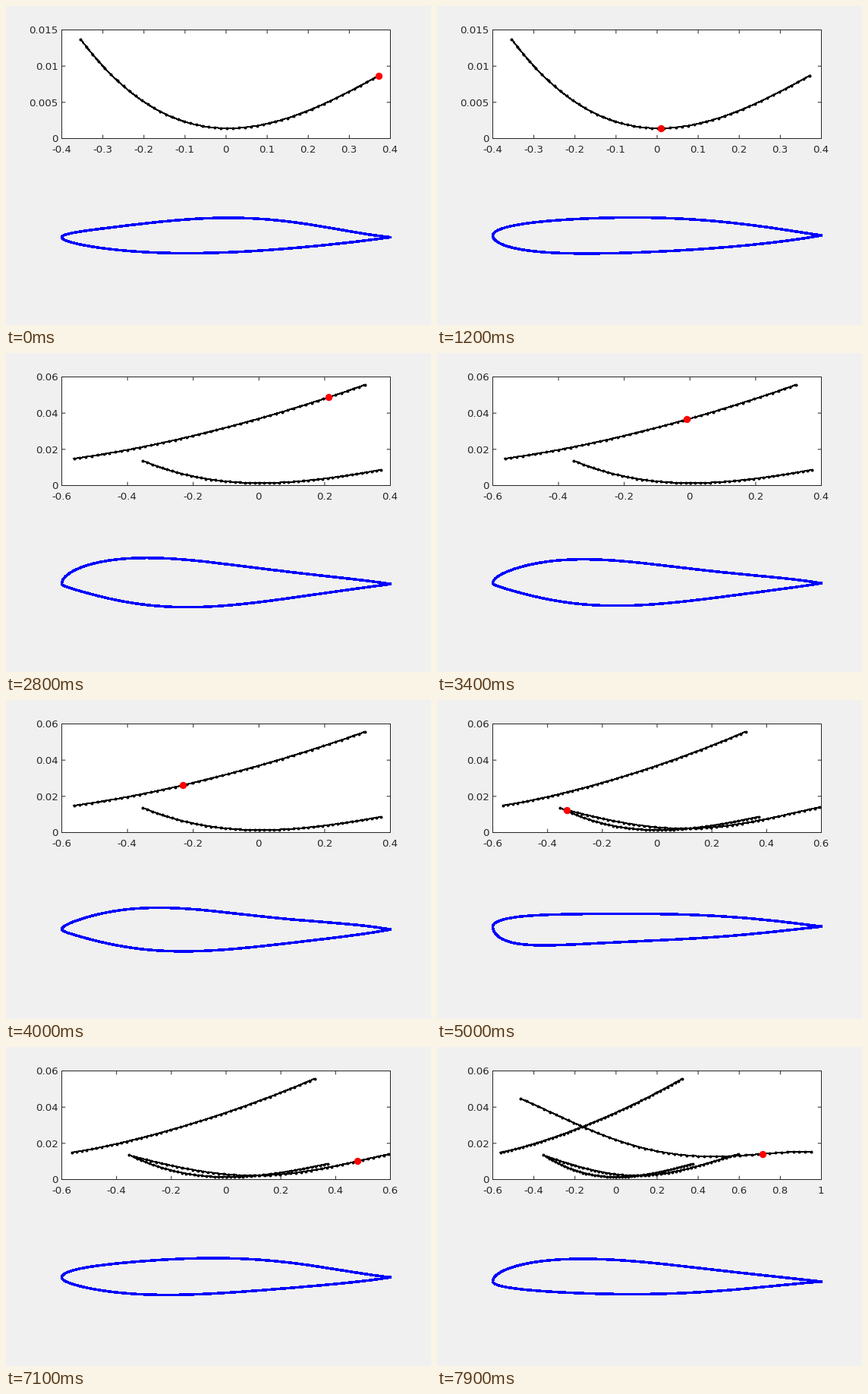
These frames come from a looping animation (560x420 px, 8 s). A matplotlib script:

```python
import numpy as np
import matplotlib.pyplot as plt
from matplotlib.animation import FuncAnimation
from matplotlib.patches import Rectangle

W, H, DPI = 560, 420, 80
PT = 72 / DPI                      # points per pixel
LEFT, RIGHT, TOP, BOTTOM = 73.5, 506.5, 31.5, 174.5
FOIL_MID = 302.2
STEPS = 25                         # frames per sweep
INK = "#262626"

plt.rcParams["font.family"] = "DejaVu Sans"


class Sweep:
    """A polar curve and the foil that morphs while the marker runs along it."""

    def __init__(self, lo, hi, values, first, last, backward=True):
        keys = np.linspace(lo, hi, len(values))
        self.fit = np.polyfit(keys, values, len(values) - 1)
        self.x = np.linspace(lo, hi, 50)
        self.y = self.at(self.x)
        self.first, self.last = np.array(first), np.array(last)
        self.ends = (hi, lo) if backward else (lo, hi)

    def at(self, x):
        return np.polyval(self.fit, x)

    def marker(self, u):
        x = self.ends[0] + (self.ends[1] - self.ends[0]) * u
        return x, self.at(x)

    def heights(self, u):
        return self.first + (self.last - self.first) * u


# Foils: upper and lower height in pixels at these chord positions
STATIONS = np.array([.05, .25, .5, .8])
BLUNT = np.array([[18, 30.7, 24.7, 9.6], [8.2, 15.4, 16.7, 8.3]])

SWEEPS = [
    Sweep(-.354, .372, [.0137, .0041, .00142, .00365, .0087],
          [[7, 18, 25.5, 13.5], [9, 19.5, 20, 10.4]],
          [[16.5, 25, 20.9, 12.3], [21, 27.9, 22.6, 13.2]]),
    Sweep(-.563, .323, [.0149, .0218, .0311, .0424, .0557],
          [[22.3, 36, 27.3, 10.9], [8.5, 27.3, 28.8, 11.8]],
          [[6.7, 23.7, 19.7, 9], [8.5, 25.3, 24.8, 12.6]]),
    Sweep(-.33, .594, [.0124, .0048, .0023, .0064, .0140],
          [[11, 16.4, 16.6, 10], [20, 23.5, 18.2, 9.3]],
          [[11, 22.2, 26.4, 13.4], [9.7, 22.3, 20.6, 10.1]], backward=False),
    Sweep(-.465, .95, [.0447, .0267, .0148, .0132, .0155],
          BLUNT, BLUNT * .83),
]

fig = plt.figure(figsize=(W / DPI, H / DPI), dpi=DPI, facecolor="#f0f0f0")
ax = fig.add_axes([0, 0, 1, 1])


def nice_step(span, most):
    """Smallest 1-2-5 step that divides the span into at most `most` parts."""
    return next(m * 10.0 ** k for k in range(-4, 2) for m in (1, 2, 5)
                if span <= most * m * 10.0 ** k)


def ticks(lo, hi, most):
    step = nice_step(hi - lo, most)
    n = np.arange(np.floor(lo / step), np.ceil(hi / step) + 1)
    return np.round(n * step, 6) + 0.0


def label(x, y, value, align):
    ax.text(x, y, f"{value:g}", ha=align, va="baseline", color=INK,
            fontsize=13.33 * PT)


def tick(xs, ys):
    ax.plot(xs, ys, color=INK, lw=PT, snap=False)


def dots(x, y, size, color):
    ax.scatter(x, y, s=(size * PT) ** 2, c=color, linewidths=0, zorder=3)


def draw_axes(xticks, yticks, to_px):
    ax.add_patch(Rectangle((LEFT, TOP), RIGHT - LEFT, BOTTOM - TOP,
                           facecolor="white", edgecolor=INK, lw=PT,
                           snap=False))
    for v in xticks:
        x, _ = to_px(v, 0)
        tick([x, x], [BOTTOM, BOTTOM - 4.3])
        tick([x, x], [TOP, TOP + 4.3])
        label(x - 0.5, 193, v, "center")
    for v in yticks:
        _, y = to_px(0, v)
        tick([LEFT, LEFT + 4.3], [y, y])
        tick([RIGHT, RIGHT - 4.3], [y, y])
        label(68.6, y + 4.7, v, "right")


def draw_foil(heights):
    t = (1 - np.cos(np.linspace(0, np.pi, 160))) / 2

    def envelope(s):
        return np.sqrt(s) * (1 - s)

    up, low = (envelope(t) * np.polyval(
        np.polyfit(STATIONS, h / envelope(STATIONS), 3), t) for h in heights)
    x = LEFT + (RIGHT - LEFT) * np.concatenate([t[::-1], t[1:]])
    y = np.concatenate([-up[::-1], low[1:]])
    y += FOIL_MID - (y.min() + y.max()) / 2
    ax.plot(x, y, color="blue", lw=2.5 * PT, solid_joinstyle="round",
            antialiased=False)


def draw(n):
    index, step = divmod(n, STEPS)
    u = step / (STEPS - 1)
    shown = SWEEPS[:index + 1]
    xticks = ticks(min(s.x[0] for s in shown), max(s.x[-1] for s in shown), 8)
    yticks = ticks(0, max(s.y.max() for s in shown), 3)

    def to_px(x, y):
        return (LEFT + (x - xticks[0]) / np.ptp(xticks) * (RIGHT - LEFT),
                BOTTOM - y / yticks[-1] * (BOTTOM - TOP))

    ax.clear()
    ax.set_xlim(0, W)
    ax.set_ylim(H, 0)
    ax.axis("off")
    draw_axes(xticks, yticks, to_px)

    for s in shown:
        x, y = to_px(s.x, s.y)
        ax.plot(x, y, color="black", lw=PT, antialiased=False)
        dots(x, y, 4, "black")

    dots(*to_px(*shown[-1].marker(u)), 9.4, "red")
    draw_foil(shown[-1].heights(u))
    return []


anim = FuncAnimation(fig, draw, frames=80, interval=100, init_func=lambda: [],
                     repeat=True, repeat_delay=0, blit=False)
plt.show()
```
